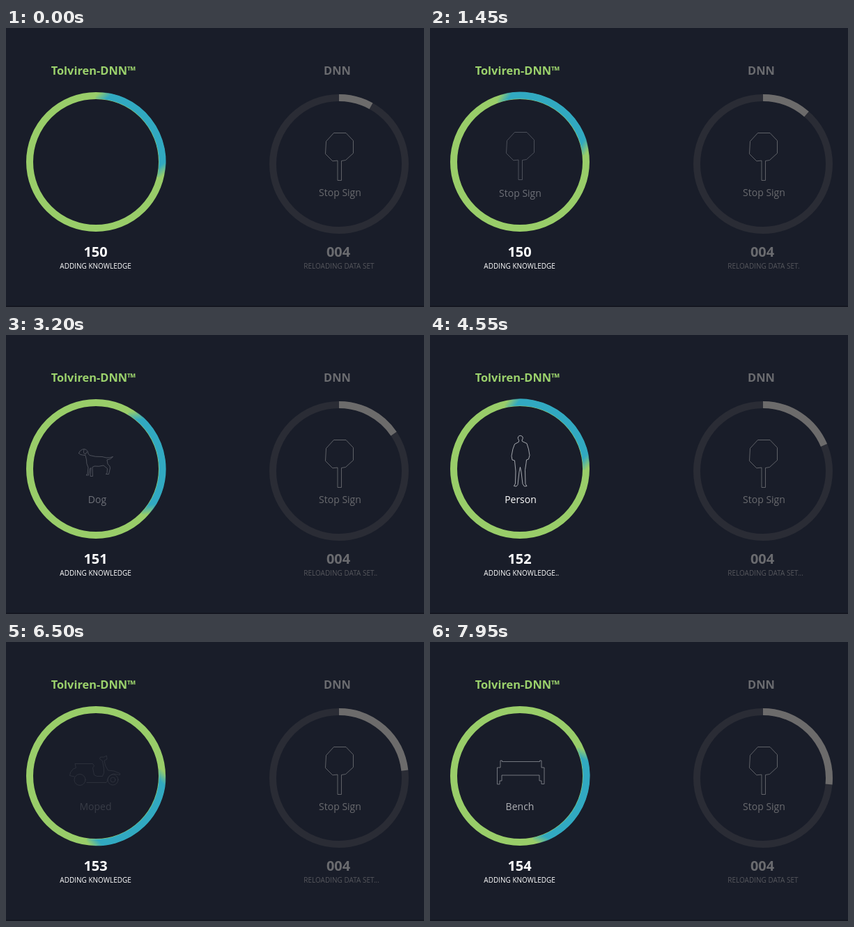
An HTML page that plays this animation: 600 px wide and 400 px high, repeating every 8000 ms.

```html
<!DOCTYPE html>
<html lang="en">
<head>
<meta charset="utf-8">
<title>Training comparison</title>
<style>
  html, body { margin: 0; width: 100%; height: 100%; overflow: hidden; background: #191d29; }
  svg { display: block; width: 600px; height: 400px; font-family: "Open Sans", sans-serif; }
  .mid { text-anchor: middle; }
  .title { font-size: 16.4px; font-weight: 700; }
  .count { font-size: 20px; font-weight: 700; }
  .label { font-size: 14px; }
  .note { font-size: 10px; }
  .icon { fill: none; stroke-width: .75; stroke-linejoin: round; stroke-linecap: round; }
  .live { fill: #fff; }
  .live .icon { stroke: #d2d4d8; }
  .idle { fill: #6a6b6f; }
  .idle .icon { stroke: #77787c; }
  .ring { fill: none; stroke-width: 10; }
  .soft { filter: blur(.5px); }
</style>
</head>
<body>
<svg viewBox="0 0 600 400">
  <defs>
    <linearGradient id="fade" gradientUnits="userSpaceOnUse" x1="-75" x2="75" y1="0" y2="0">
      <stop offset="0" stop-color="#31a9c1" stop-opacity="0"/>
      <stop offset=".09" stop-color="#31a9c1"/>
      <stop offset=".91" stop-color="#31a9c1"/>
      <stop offset="1" stop-color="#31a9c1" stop-opacity="0"/>
    </linearGradient>
    <path id="sign" d="M127 189.5V217.5H132.500V189.5L138.500 188.500 149.500 178.500V160.500L139 149.500H121.500L110.500 161.500 109.500 179.500 119.500 189.500Z"/>
  </defs>
  <rect width="600" height="400" fill="#191d29"/>
  <rect y="398" width="600" height="2" fill="#141721"/>

  <text class="mid title" x="125.5" y="66.500" fill="#9bd16c">Tolviren-DNN™</text>
  <circle class="ring" cx="129" cy="192" r="95" stroke="#99cd69"/>
  <g transform="translate(129 192)">
    <path id="sweep" class="ring" stroke="url(#fade)"/>
  </g>
  <g class="live">
    <g id="items"></g>
    <text id="count" class="mid count" x="128.500" y="327.500"></text>
    <text id="noteA" class="note" x="77.300" y="345"></text>
  </g>

  <g class="idle">
    <text class="mid title" x="475.500" y="66.500">DNN</text>
    <circle class="ring" cx="478" cy="195" r="95" stroke="#2a2c35"/>
    <circle id="bar" class="ring" cx="478" cy="195" r="95" stroke="#6c6b6b"
            pathLength="360" transform="rotate(-90 478 195)"/>
    <use class="icon" href="#sign" x="349" y="1"/>
    <text class="mid label" x="479.500" y="241">Stop Sign</text>
    <text class="mid count soft" x="477" y="328">004</text>
    <text id="noteB" class="note" x="427.300" y="345" fill="#55565c"></text>
  </g>
</svg>
<script>
const LOOP = 8000;
const FADE = 300;
const SPIN = 360 / 1535;
const $ = id => document.getElementById(id);
const clamp = v => Math.max(0, Math.min(1, v));

// Things learned, one after the other
const items = [
  { name: "Stop Sign", x: 129.5, y: 242, from: 0, to: 1560, art: '<use href="#sign"/>' },
  { name: "Dog", x: 131, y: 241, from: 1560, to: 3310, art: `<path d="M104.5 169.500l2-3.500q3-2.500 6-2.500 3 .5 4.500 3
    .5 4 3 6 8 2.500 18 2l6 1.500q5 .5 9.500-1.500-3 4-8.500 4.500l1 6q4 3 3.500 6l-2 8.500h-4l1.500-2 .5-6-5.500-4.500
    q-7 2-13 1l-3 1.500.5 13h-3.500l1-12-1.500 1-2 9.500h-3.500l2-2 1-9q-3-6-2.500-11l-1.500-6.500-4.500-.5q-3 0-5-2.500Z
    M112 164.500q-2 5 2 6.500l2-3.500"/>` },
  { name: "Person", x: 130, y: 241, from: 3310, to: 4930, art: `<path d="M127.500 151q-2-3-1-5 3-3.500 6.500 0 1 2-1 5
    l.5 1.500 6.500 3q3 8 4 17l-1.500 5.500-3 1-.5 4.500-1.500 10 .5 20 2 3-3.500.5-2.500-3.500-2-17-1.500-7-1.500 7-2 18-2 2.500-3.500-.5
    2-3.500.5-18-1.500-15-3.500-1-1-5.500q1.500-11 4.500-17l5.500-3Z"/>` },
  { name: "Moped", x: 128.5, y: 241, from: 4930, to: 6540, art: `<path d="M98 193l-6.500-1.500q0-5 5-9.500l4-1.500-1.500-6h25.500
    l2 3-2 3 2 10 4 2h8q3-4 2-11l-2-11-4-3 1-2.500h5l4-2 .5 5-4 2 1.500 7 4 7 8.500 1 8.500 3.500v2l-9-1.500q-8 2-9.500 11
    l-1 1.500h-28"/><circle cx="106" cy="197.500" r="8"/><circle cx="153.500" cy="197.500" r="7.500"/>
    <circle cx="153.500" cy="197.500" r="3.500"/>` },
  { name: "Bench", x: 129, y: 241, from: 6540, to: 8145, art: `<path d="M96.500 203.500V180H101V170h2.500v1.500h54V170h2.500v10h4
    v23.500h-4V199h-3v-8h-54v8h-3v4.500Z"/>` }
];

$("items").innerHTML = items.map(i =>
  `<g><g class="icon">${i.art}</g><text class="mid label" x="${i.x}" y="${i.y}">${i.name}</text></g>`).join("");
const groups = [...$("items").children];

// Start times of each run of three dots
const runsA = [500, 2100, 4350, 5350, 6900];
const runsB = [1400, 3000, 4200, 5350, 6200, 7150];
function dots(t, runs) {
  const start = runs.find(s => t >= s && t < s + 450);
  return start === undefined ? "" : ".".repeat(1 + Math.floor((t - start) / 150));
}

// Arc centred on the top of the ring
function arc(r, half) {
  const a = half * Math.PI / 180, x = r * Math.sin(a), y = -r * Math.cos(a);
  return `M${-x} ${y}A${r} ${r} 0 0 1 ${x} ${y}`;
}
$("sweep").setAttribute("d", arc(95.6, 52));

function draw(t) {
  $("sweep").setAttribute("transform", `rotate(${51.5 + t * SPIN})`);
  $("bar").setAttribute("stroke-dasharray", `${29 + t * 0.008365} 360`);
  items.forEach((it, i) => {
    const shown = Math.min(clamp((t - it.from - 100) / FADE), clamp((it.to - t) / FADE));
    groups[i].setAttribute("opacity", shown);
  });
  $("count").textContent = 150 + items.findIndex(it => t < it.to);
  $("noteA").textContent = "ADDING KNOWLEDGE" + dots(t, runsA);
  $("noteB").textContent = "RELOADING DATA SET" + dots(t, runsB);
}

function tick() {
  draw(performance.now() % LOOP);
  requestAnimationFrame(tick);
}
tick();
</script>
</body>
</html>
```
